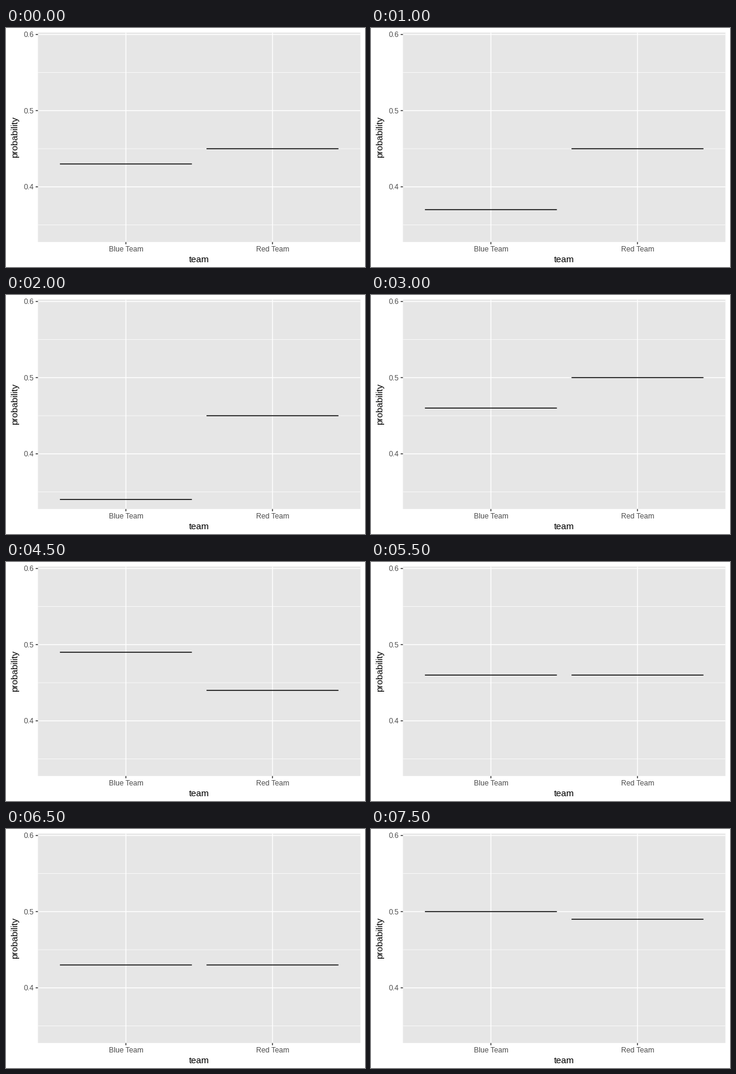
Recreate the animation shown at these times as a matplotlib script. Size 600x400 px, loop 8000 ms.

```python
import matplotlib.pyplot as plt
from matplotlib.animation import FuncAnimation
from matplotlib.patches import Rectangle

W, H, DPI = 600, 400, 100
PT = 72 / DPI                                   # points per pixel
LEFT, RIGHT, TOP, BOTTOM = 53.4, 592.4, 7.64, 358.2
Y_MAX, Y_SPAN = 0.6025, 0.275
STEP = (RIGHT - LEFT) / 2.2
LINE, THIN = 1.48, 0.74

# Outcome draws in percent, one per half second
BLUE = [43, 53, 37, 49, 34, 40, 46, 45, 50, 49, 47, 46, 55, 43, 56, 50]
RED = [45, 42, 45, 44, 45, 47, 50, 41, 44, 44, 46, 46, 43, 43, 46, 49]

plt.rcParams["font.family"] = "Liberation Sans"
plt.rcParams["path.snap"] = False

fig = plt.figure(figsize=(W / DPI, H / DPI), dpi=DPI, facecolor="white")
ax = fig.add_axes([0, 0, 1, 1])
ax.set(xlim=(0, W), ylim=(H, 0))
ax.axis("off")


def y_pos(p):
    return TOP + (Y_MAX - p) / Y_SPAN * (BOTTOM - TOP)


def x_pos(i):
    return LEFT + (0.6 + i) * STEP


def line(xs, ys, color, width=LINE, z=2):
    return ax.plot(xs, ys, color=color, lw=width * PT, zorder=z,
                   solid_capstyle="butt", snap=False)[0]


def label(x, y, text, size, color, **kw):
    kw = {"ha": "center", "va": "baseline", **kw}
    ax.text(x, y, text, fontsize=size, color=color, **kw)


ax.add_patch(Rectangle((LEFT, TOP), RIGHT - LEFT, BOTTOM - TOP,
                       fc="#e6e6e6", lw=0, zorder=1))

for p in (0.35, 0.45, 0.55):
    line([LEFT, RIGHT], [y_pos(p)] * 2, "white", THIN)
for p in (0.4, 0.5, 0.6):
    y = y_pos(p)
    line([LEFT, RIGHT], [y, y], "white")
    line([LEFT - 3.8, LEFT], [y, y], "#333333")
    label(46.5, y + 4.4, f"{p:.1f}", 8.8, "#4d4d4d", ha="right")
for i, team in enumerate(("Blue Team", "Red Team")):
    x = x_pos(i)
    line([x, x], [TOP, BOTTOM], "white")
    line([x, x], [BOTTOM, BOTTOM + 3.8], "#333333")
    label(x, 374, team, 8.8, "#4d4d4d")

label((LEFT + RIGHT) / 2, 392, "team", 11, "black")
label(18.6, (TOP + BOTTOM) / 2, "probability", 11, "black",
      rotation=90, rotation_mode="anchor")

bars = [line([x_pos(i) - 0.45 * STEP, x_pos(i) + 0.45 * STEP], [0, 0],
             "black", z=3) for i in range(2)]


def update(n):
    for bar, draws in zip(bars, (BLUE, RED)):
        bar.set_ydata([y_pos(draws[n] / 100)] * 2)
    return bars


anim = FuncAnimation(fig, update, frames=len(BLUE), interval=500,
                     repeat=True, repeat_delay=0, blit=False)
plt.show()
```
